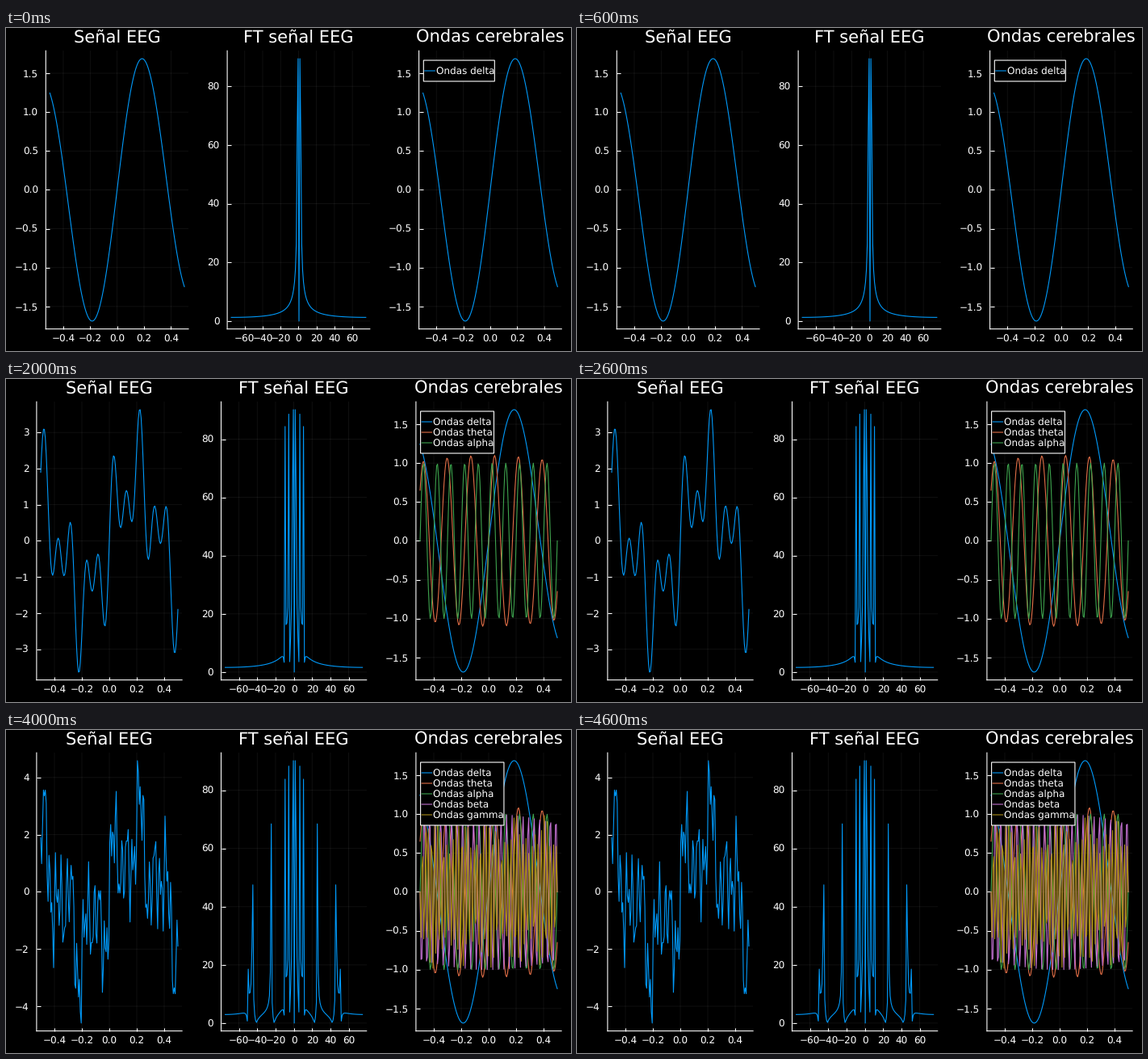
Animation of 700x400 px, one loop 5 s. Source, as a matplotlib script:

```python
import numpy as np
import matplotlib.pyplot as plt
from matplotlib.animation import FuncAnimation
from matplotlib.patches import Rectangle
from matplotlib.ticker import FuncFormatter, MultipleLocator

W, H, DPI = 700, 400, 100
PT = 72 / DPI  # points per pixel
TOP, BOTTOM = 28.2, 372.7
N = 150

plt.rcParams.update({
    "font.family": "DejaVu Sans",
    "text.hinting": "none",
    "text.color": "white",
    "axes.facecolor": "black",
    "axes.edgecolor": "white",
    "axes.xmargin": 0.03,
    "axes.ymargin": 0.03,
    "path.simplify": False,
    "path.snap": False,
})

t = np.linspace(-0.5, 0.5, N)
freq = np.linspace(-N / 2, N / 2, N)


def tone(f, amp=1.0):
    return amp * np.sin(2 * np.pi * f * t)


BANDS = [
    ("delta", "#009afa", tone(1.4, 1.475) + tone(0.8, 0.268)),
    ("theta", "#e36f47", tone(5.81) + tone(5.35, 0.1)),
    ("alpha", "#3ea44e", tone(10)),
    ("beta", "#c371d2", tone(25)),
    ("gamma", "#ac8e18", tone(45, 0.8) + tone(50, 0.2)),
]
BLUE = BANDS[0][1]
Y_STEPS = [0.5, 1, 1, 2, 2]

fig = plt.figure(figsize=(W / DPI, H / DPI), dpi=DPI, facecolor="black")


def number(step):
    digits = 0 if step >= 1 else 1
    return FuncFormatter(lambda v, _: f"{v:.{digits}f}".replace("-", "\u2212"))


def panel(left, width, title, x, curves, xstep, ystep):
    ax = fig.add_axes([left / W, 1 - BOTTOM / H, width / W, (BOTTOM - TOP) / H])
    for y, color in curves:
        ax.plot(x, y, color=color, lw=1.1 * PT, solid_joinstyle="round")
    for axis, step in ((ax.xaxis, xstep), (ax.yaxis, ystep)):
        axis.set_major_locator(MultipleLocator(step))
        axis.set_major_formatter(number(step))
    ax.tick_params(direction="in", length=4.5 * PT, width=1.1 * PT,
                   color="white", labelcolor="white", labelsize=12 * PT)
    ax.tick_params(axis="x", pad=7.2 * PT)
    ax.tick_params(axis="y", pad=9.2 * PT)
    ax.grid(color="white", alpha=0.08, lw=0.8 * PT)
    ax.set_axisbelow(True)
    ax.spines[["top", "right"]].set_visible(False)
    ax.spines[["left", "bottom"]].set_linewidth(1.1 * PT)
    fig.text((left + width / 2) / W, 1 - 18.1 / H, title, size=21 * PT,
             ha="center", va="baseline")


def legend(left, bands):
    ax = fig.add_axes([0, 0, 1, 1], zorder=5)
    ax.set(xlim=(0, W), ylim=(H, 0))
    ax.axis("off")
    widths = []
    for i, (name, color, _) in enumerate(bands):
        y = 53 + 13 * i
        ax.plot([left + 1.5, left + 14], [y, y], color=color, lw=1.1 * PT, zorder=4)
        label = ax.text(left + 15.5, y + 3.8, f"Ondas {name}", size=12 * PT,
                        va="baseline", zorder=4)
        widths.append(label.get_window_extent().width)
    ax.add_patch(Rectangle((left, 40), 15.5 + max(widths), 13 * (len(bands) + 1),
                           fc="black", ec="white", lw=1.1 * PT, zorder=3))


def draw(i):
    fig.clear()
    bands = BANDS[:i + 1]
    signal = sum(wave for _, _, wave in bands)
    spectrum = np.abs(np.fft.fftshift(np.fft.fft(signal)))
    # Wider tick labels leave less room for the plots
    lefts, width = ((49.3, 274.1, 511.6), 176.7) if i == 0 else ((37.9, 266.5, 507.9), 180.2)
    panel(lefts[0], width, "Señal EEG", t, [(signal, BLUE)], 0.2, Y_STEPS[i])
    panel(lefts[1], width, "FT señal EEG", freq, [(spectrum, BLUE)], 20, 20)
    panel(lefts[2], width, "Ondas cerebrales", t,
          [(wave, color) for _, color, wave in bands], 0.2, 0.5)
    legend(lefts[2] + 5.7, bands)
    return []


anim = FuncAnimation(fig, draw, frames=len(BANDS), init_func=lambda: draw(0),
                     interval=1000, repeat=True, repeat_delay=0, blit=False)
plt.show()
```
